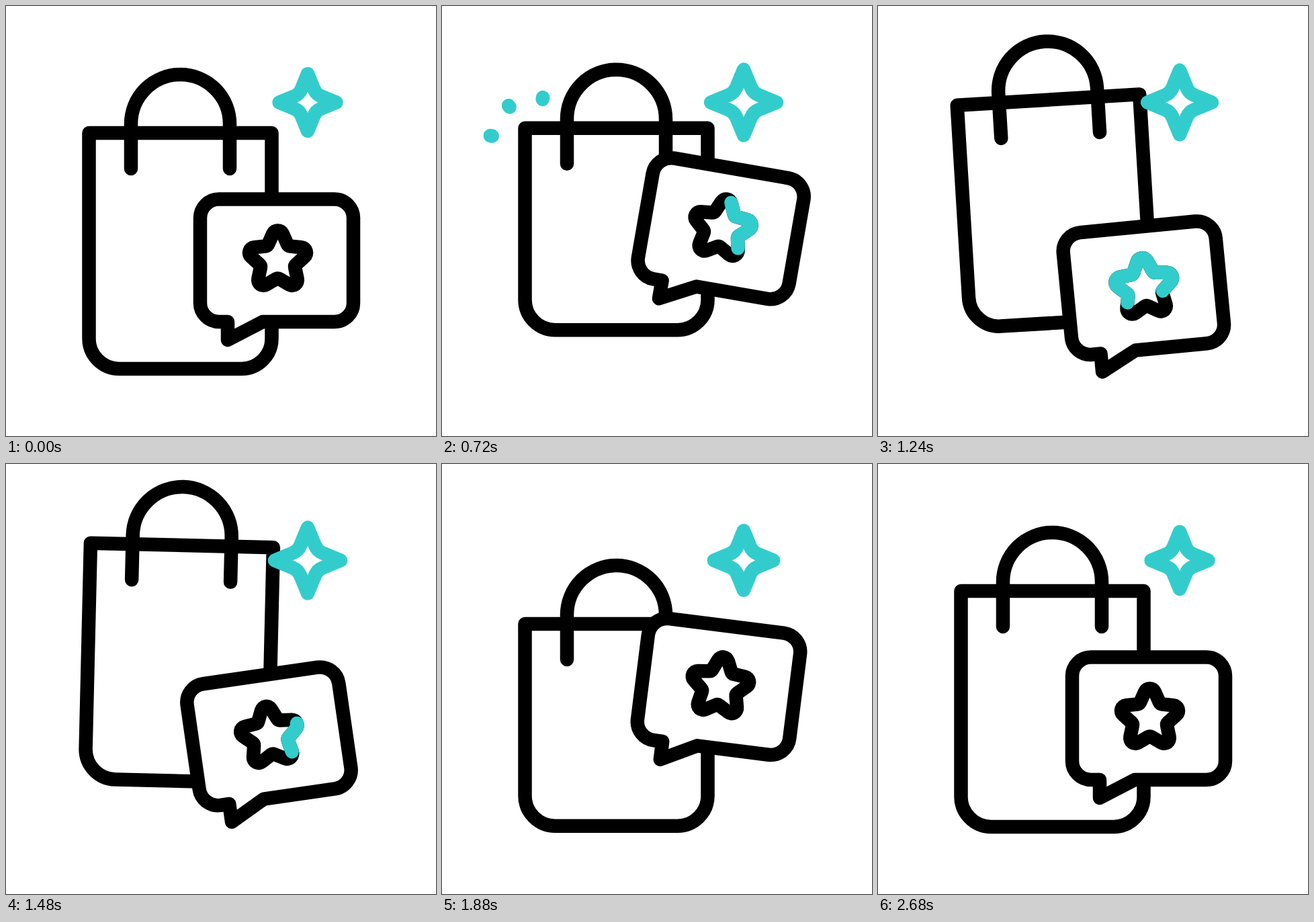
An HTML page that plays this animation: 640x640 px, repeating every 3000 ms.

```html
<!DOCTYPE html>
<html lang="en">
<head>
<meta charset="utf-8">
<title>Shopping bag review</title>
<style>
  html, body { margin: 0; height: 100%; overflow: hidden; background: #fff; }
  svg { display: block; width: 100vw; height: 100vh; }
  path { fill: none; stroke: #000; stroke-width: 20.5; stroke-linecap: round; stroke-linejoin: round; }
  .teal { stroke: #3cc; }
  #bubble { fill: #fff; }
</style>
</head>
<body>
<svg viewBox="0 0 640 640">
  <path id="rays" class="teal"/>
  <g id="bag">
    <path id="body"/>
    <path d="M186 242V175.5a73.5 73.5 0 0 1 147 0V242"/>
  </g>
  <g id="card">
    <path id="bubble" d="M317 287.5H489a28 28 0 0 1 28 28V442a28 28 0 0 1-28 28H382L330 497V470H317a28 28 0 0 1-28-28V315.5a28 28 0 0 1 28-28Z"/>
    <path id="star"/>
    <path id="trace" class="teal" pathLength="1"/>
  </g>
  <path id="spark" class="teal"/>
</svg>
<script>
const LOOP = 3000, STEP = 40;
const $ = id => document.getElementById(id);
const set = (id, name, value) => $(id).setAttribute(name, value);

// Eased rise from 0 to 1 between two times.
function ramp(t, from, to) {
  const u = Math.min(1, Math.max(0, (t - from) / (to - from)));
  return (1 - Math.cos(Math.PI * u)) / 2;
}

// Swings up, down, up again and back to rest.
const sway = t => ramp(t, 240, 690) - 1.85 * ramp(t, 690, 1320)
  + 1.85 * ramp(t, 1320, 1960) - ramp(t, 1960, 2530);

// Star with sharp or rounded tips and rounded notches, turning clockwise from the top.
function starPath(cx, cy, tips, outer, inner, tipR, notchR) {
  const n = tips * 2;
  const points = Array.from({ length: n }, (_, i) => {
    const a = Math.PI * i / tips, r = i % 2 ? inner : outer;
    return [cx + r * Math.sin(a), cy - r * Math.cos(a)];
  });
  const corners = points.map(([x, y], i) => {
    const r = i % 2 ? notchR : tipR;
    const [px, py] = points[(i + n - 1) % n], [qx, qy] = points[(i + 1) % n];
    const edge = Math.hypot(px - x, py - y);
    const ux = (px - x) / edge, uy = (py - y) / edge;
    const vx = (qx - x) / edge, vy = (qy - y) / edge;
    const d = r / Math.tan(Math.acos(ux * vx + uy * vy) / 2);
    return `${x + ux * d} ${y + uy * d}A${r} ${r} 0 0 ${1 - i % 2} ${x + vx * d} ${y + vy * d}`;
  });
  return 'M' + corners.join('L') + 'Z';
}

function drawBag(t) {
  const lift = 68.5 * (ramp(t, 375, 840) - ramp(t, 1460, 1920));
  const squash = 50.5 * (ramp(t, 240, 560) - ramp(t, 880, 1500) + ramp(t, 1500, 1860) - ramp(t, 1860, 2340));
  const lean = 4 * (2 * ramp(t, 1150, 1690) - ramp(t, 720, 1150) - ramp(t, 1690, 1880));
  set('bag', 'transform', `translate(0 ${squash - lift}) rotate(${lean} 259.5 289)`);
  set('body', 'd', `M123.5 189H395.5V${495 - squash}a45 45 0 0 1-45 45H168.5a45 45 0 0 1-45-45Z`);
}

function drawCard(t) {
  // The turn trails the bounce slightly.
  set('card', 'transform', `translate(0 ${-60 * sway(t)}) rotate(${10.3 * sway(t - 90)} 340 455)`);
  const tail = .06 + 1.34 * ramp(t, 840, 1670);
  const len = .06 + 1.34 * ramp(t, 390, 1390) - tail;
  set('trace', 'visibility', len > .002 ? 'visible' : 'hidden');
  set('trace', 'stroke-dasharray', `${len} ${1 - len}`);
  set('trace', 'stroke-dashoffset', -tail);
}

function drawRays(t) {
  const near = 65 + 45.5 * ramp(t, 850, 1160);
  const far = 65 + 45.5 * ramp(t, 670, 980);
  let d = '';
  for (let i = 0; i < 3 && far - near > .1; i++) {
    const a = (188.4 + 45.5 * i) * Math.PI / 180;
    const point = r => `${139 + r * Math.cos(a)} ${203 + r * Math.sin(a)}`;
    d += `M${point(near)}L${point(far)}`;
  }
  set('rays', 'd', d);
}

function drawSpark(t) {
  const start = 240, period = 760, pulses = 3;
  const phase = Math.min(pulses, Math.max(0, (t - start) / period));
  const k = 1 + .09 * (1 - Math.cos(2 * Math.PI * phase));
  set('spark', 'd', starPath(449, 143.5, 4, 42.5 * k, 17.5 * k, 0, 18 * k));
}

const star = starPath(404.5, 378.5, 5, 56, 26.3, 8, 5);
set('star', 'd', star);
set('trace', 'd', star);

const begin = performance.now();
function frame() {
  const now = (performance.now() - begin) % LOOP;
  const t = Math.floor(now / STEP) * STEP;
  for (const draw of [drawBag, drawCard, drawRays, drawSpark]) draw(t);
  requestAnimationFrame(frame);
}
frame();
</script>
</body>
</html>
```
